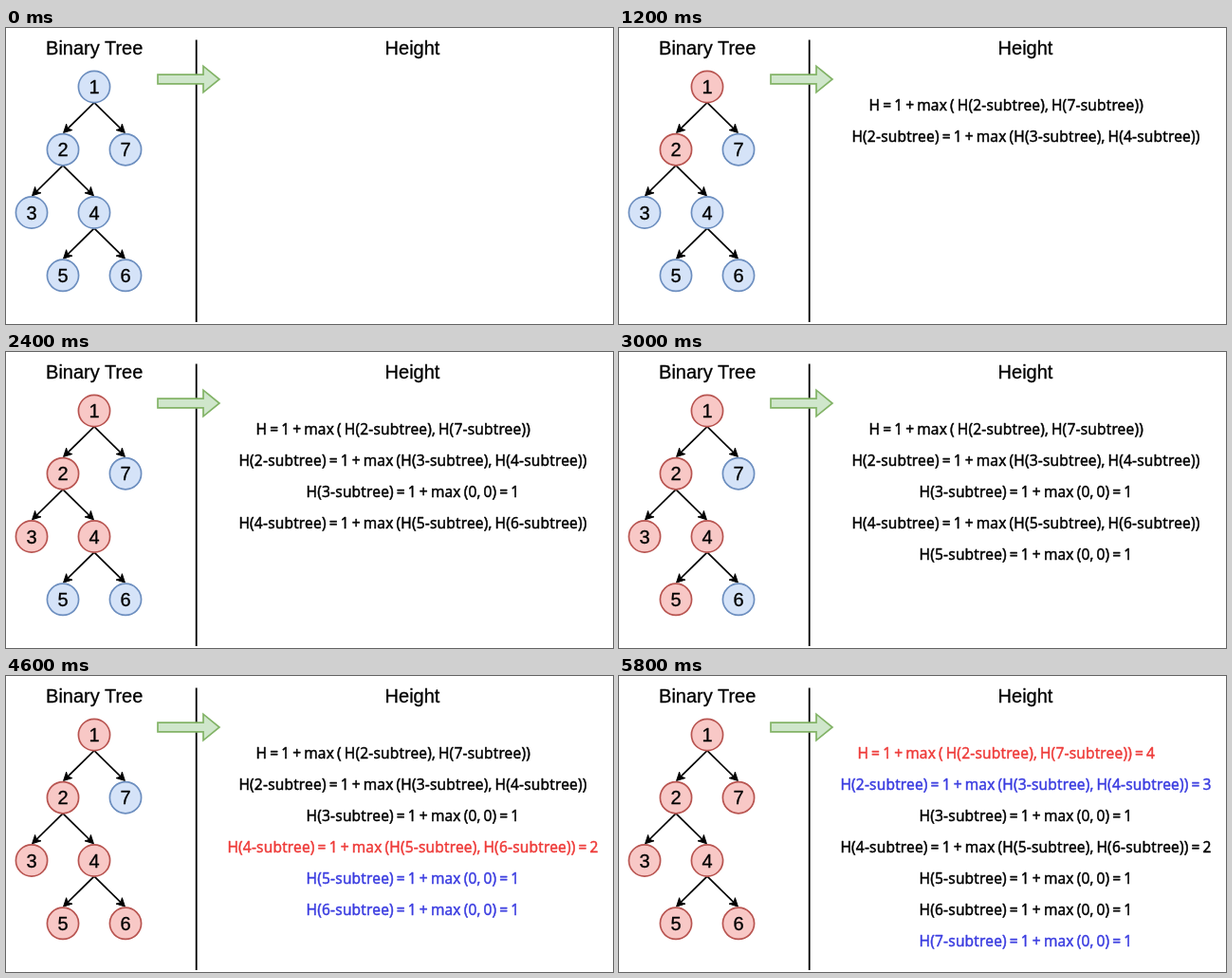
Recreate the animation shown at these times as an HTML page. Size 640 px wide and 312 px high, loop 6000 ms.

```html
<!DOCTYPE html>
<html lang="en">
<head>
<meta charset="utf-8">
<title>Binary tree height</title>
<style>
  html, body { margin: 0; width: 100%; height: 100%; overflow: hidden; background: #fff; }
  svg { display: block; width: 100%; height: 100%; }
  text { text-anchor: middle; stroke-linejoin: round; }
  .label { font: 20px "Liberation Sans", Arial, sans-serif; stroke: #000; stroke-width: .3; }
  .calc {
    font: 15.5px "Open Sans", "Noto Sans", sans-serif;
    letter-spacing: .21px; word-spacing: -1.28px; stroke-width: .5;
  }
</style>
</head>
<body>
<svg id="stage" viewBox="0 0 640 312"></svg>
<script>
const LOOP = 6000, STEP = 600, LAST_STEP = 10, LAST_START = 5800;
const BLACK = '#000', RED = '#ee3a38', BLUE = '#3a3ce0';
const IDLE = ['#d5e3f8', '#6c8ebf'], VISITED = ['#f8c8c6', '#b85450'];
const RADIUS = 16.6;

const stage = document.getElementById('stage');

function add(tag, attrs, text) {
  const el = document.createElementNS('http://www.w3.org/2000/svg', tag);
  for (const key in attrs) el.setAttribute(key, attrs[key]);
  if (text) el.textContent = text;
  stage.appendChild(el);
  return el;
}

// Position, parent index and the step at which each node is visited
const nodes = [
  { x: 93, y: 62, step: 1 },
  { x: 60, y: 128.2, parent: 0, step: 2 },
  { x: 27, y: 194.5, parent: 1, step: 3 },
  { x: 93, y: 194.5, parent: 1, step: 4 },
  { x: 60, y: 260.8, parent: 3, step: 5 },
  { x: 126, y: 260.8, parent: 3, step: 6 },
  { x: 126, y: 128.2, parent: 0, step: 9 }
];

const pair = (a, b) => `H(${a}-subtree), H(${b}-subtree))`;
const leaf = n => ({ text: `H(${n}-subtree) = 1 + max (0, 0) = 1` });
const lines = [
  { text: 'H = 1 + max ( ' + pair(2, 7), x: 408.3, result: ' = 4', solved: 10 },
  { text: 'H(2-subtree) = 1 + max (' + pair(3, 4), result: ' = 3', solved: 8 },
  leaf(3),
  { text: 'H(4-subtree) = 1 + max (' + pair(5, 6), result: ' = 2', solved: 7 },
  leaf(5), leaf(6), leaf(7)
];

// Step -> the line being solved and the lines it uses
const highlights = {
  7: { red: 3, blue: [4, 5] },
  8: { red: 1, blue: [2, 3] },
  10: { red: 0, blue: [1, 6] }
};

function drawEdge(from, to) {
  const x1 = from.x, y1 = from.y + RADIUS, x2 = to.x, y2 = to.y - RADIUS - .6;
  const len = Math.hypot(x2 - x1, y2 - y1);
  const ux = (x2 - x1) / len, uy = (y2 - y1) / len;
  const at = (back, side) => `${x2 - ux * back - uy * side},${y2 - uy * back + ux * side}`;
  add('path', { d: `M${x1},${y1} L${at(7, 0)}`, stroke: BLACK, 'stroke-width': 1.7 });
  add('path', { d: `M${at(.8, 0)} L${at(9.5, 4.5)} L${at(7, 0)} L${at(9.5, -4.5)}Z`,
    stroke: BLACK, 'stroke-width': 1 });
}

function build() {
  add('text', { x: 93.2, y: 28, class: 'label' }, 'Binary Tree');
  add('text', { x: 428.5, y: 28, class: 'label' }, 'Height');
  add('path', { d: 'M200.7,12.5V310', stroke: BLACK, 'stroke-width': 1.8 });
  add('path', { d: 'M160,49.2H208V40.2L225,54 208,67.8V58.8H160Z',
    fill: '#cfe6cb', stroke: '#82b366', 'stroke-width': 1.7 });

  for (const node of nodes) if ('parent' in node) drawEdge(nodes[node.parent], node);
  nodes.forEach((node, i) => {
    node.el = add('circle', { cx: node.x, cy: node.y, r: RADIUS, 'stroke-width': 1.7 });
    add('text', { x: node.x, y: node.y + 7.2, class: 'label' }, String(i + 1));
  });
  lines.forEach((line, i) => {
    line.el = add('text', { x: line.x || 429, y: 86.7 + 33 * i, class: 'calc' });
  });
}

function lineColor(i, step) {
  const mark = highlights[step];
  if (!mark) return BLACK;
  return mark.red === i ? RED : mark.blue.includes(i) ? BLUE : BLACK;
}

let shown = -1;
function render(time) {
  const t = time % LOOP;
  const step = t >= LAST_START ? LAST_STEP : Math.floor(t / STEP);
  if (step === shown) return;
  shown = step;
  nodes.forEach((node, i) => {
    const visited = step >= node.step;
    const [fill, stroke] = visited ? VISITED : IDLE;
    node.el.setAttribute('fill', fill);
    node.el.setAttribute('stroke', stroke);

    const line = lines[i], color = lineColor(i, step);
    line.el.textContent = visited ? line.text + (step >= line.solved ? line.result : '') : '';
    line.el.setAttribute('fill', color);
    line.el.setAttribute('stroke', color);
  });
}

build();
const start = performance.now();
function tick() {
  render(performance.now() - start);
  requestAnimationFrame(tick);
}
tick();
</script>
</body>
</html>
```
